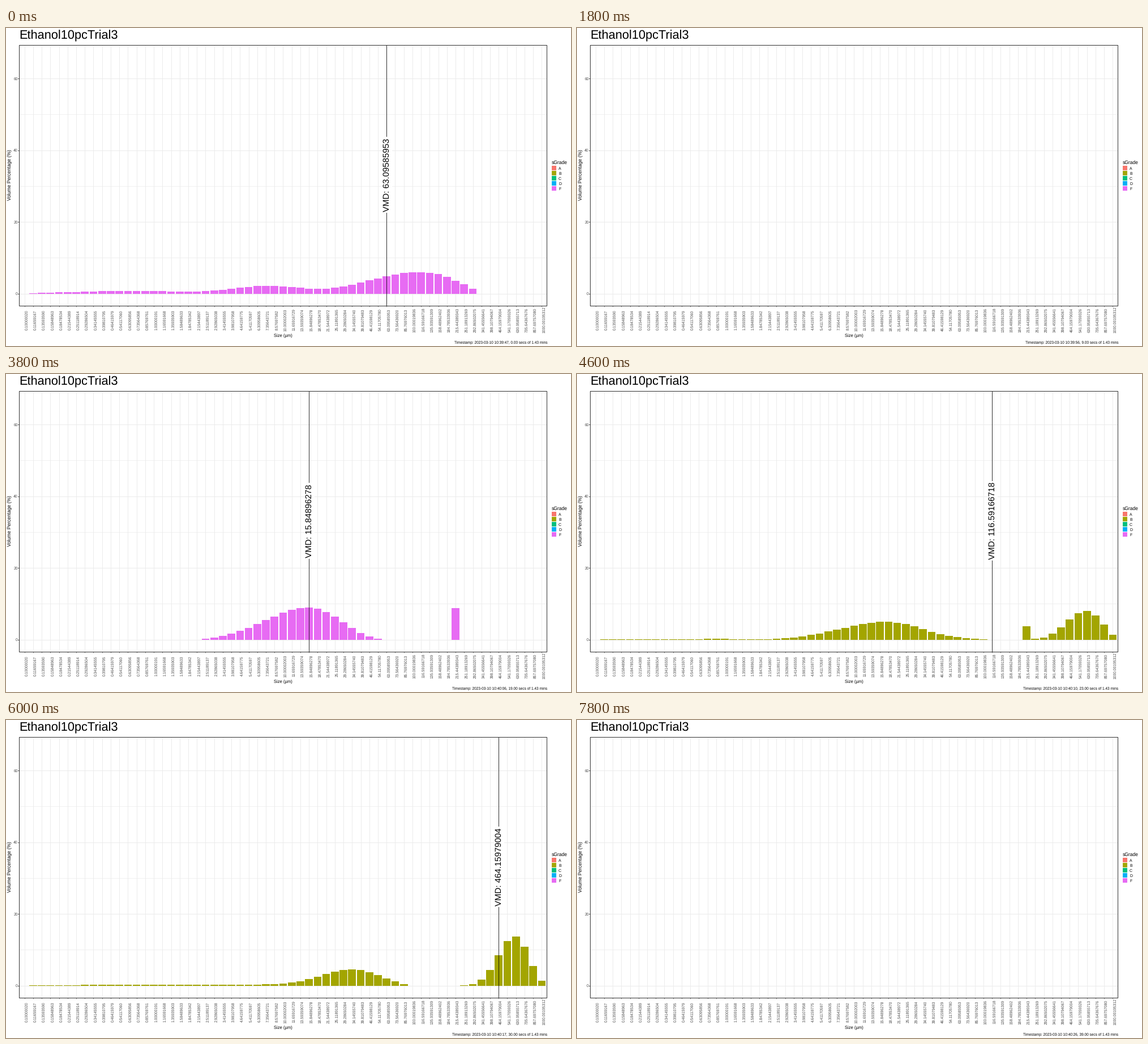
Recreate the animation shown at these times as a matplotlib script. Size 998 by 561 pixels, loop 8000 ms.

```python
import numpy as np
import matplotlib.pyplot as plt
from matplotlib.animation import FuncAnimation
from matplotlib.patches import Rectangle

W, H, DPI = 998, 561, 64
PT = 72 / DPI                              # points per pixel
FRAMES, STEP = 40, 200

LEFT, RIGHT, TOP, BOTTOM = 23.5, 955.5, 29.5, 489.5
ZERO, UNIT = 468.5, 6.325                  # y of 0 %, pixels per percent
BINS = 61
PITCH = (RIGHT - LEFT) / (BINS + 0.2)
XS = LEFT + PITCH * (np.arange(BINS) + 0.6)
SIZES = np.float32(10 ** (np.arange(BINS) / 15 - 1) * 1.000001965)

GRADES = {"A": "#F8766D", "B": "#A3A500", "C": "#00BF7D",
          "D": "#00B0F6", "F": "#E76BF3"}

plt.rcParams["font.family"] = "Liberation Sans"
plt.rcParams["text.hinting"] = "none"


def curve(knots, **runs):
    """Heights per bin: straight lines between knots, then exact runs."""
    y = np.interp(np.arange(BINS), *zip(*knots), right=0)
    for name, run in runs.items():
        start = int(name[1:])
        y[start:start + len(run)] = run
    return y


BROAD = curve([(0, 0), (1, .1), (3, .3), (7, .5), (10, .7), (14, .75),
               (19, .55), (21, .7), (23, 1.1), (25, 1.6), (27, 2.1),
               (28, 2.2), (30, 2), (33, 1.4), (35, 1.4), (37, 2)],
              b38=[2.5, 3.1, 3.7, 4.25, 4.8, 5.3, 5.7, 5.9, 6,
                   5.8, 5.4, 4.6, 3.6, 2.6, 1.4])
MEDIUM = curve([(12, 0), (13, .1), (17, .1), (20, .2), (22, .4)],
               b23=[.5, .75, 1, 1.35, 1.9, 2.5, 3.4, 4.4, 5.6, 6.9, 8.2,
                    9.2, 9.7, 9.4, 8.3, 6.6, 4.5, 2.6, 1.1, .2],
               b57=[12])
FINE = curve([(0, 0), (20, 0)],
             b21=[.2, .55, 1, 1.6, 2.4, 3.3, 4.3, 5.4, 6.4, 7.5, 8.3,
                  8.8, 9, 8.6, 7.7, 6.4, 4.8, 3.2, 1.8, .8, .2],
             b50=[8.8])
COARSE = curve([(0, 0), (1, .1), (6, .15), (14, .3), (20, .2), (23, .3),
                (26, .5), (28, .8), (30, 1.05), (32, 1.5), (34, 2.2),
                (35, 2.5), (36, 2.75), (37, 2.8), (38, 2.7), (39, 2.5),
                (40, 2.1), (42, 1.2), (44, .4), (45, .1), (46, 0)],
               b51=[.3, 1.1, 2.9, 5.9, 9.7, 12.9, 13.9, 11.7, 7.2, 2.3])
TWIN = curve([(0, 0), (1, .1), (6, .15), (14, .3), (20, .2), (27, .3),
              (29, .4), (30, .55)],
             b31=[.8, 1.2, 1.8, 2.5, 3.2, 3.9, 4.4, 4.5, 4.3, 3.7,
                  2.9, 2, 1.2, .4],
             b51=[.15, .4, 1.6, 4.4, 8.5, 12.4, 13.7, 10.8, 5.5, 1.3])

# second, heights, median bin, grade
BURSTS = [
    [(0, BROAD, 42, "F"), (6, COARSE, 55, "B")],
    [(12, COARSE, 55, "B"), (15, MEDIUM, 35, "F"), (19, FINE, 33, "F"),
     (26, COARSE, 55, "B"), (30, TWIN, 55, "B"), (35, TWIN, 55, "B")],
]


def state(sec):
    """Heights, median bin and grade at a second, or None between bursts."""
    for keys in BURSTS:
        for a, b in zip(keys, keys[1:]):
            if a[0] <= sec <= b[0]:
                u = (sec - a[0]) / (b[0] - a[0])
                mid = int(round(a[2] + (b[2] - a[2]) * u))
                return a[1] + (b[1] - a[1]) * u, mid, (b if u > .5 else a)[3]
    return None


fig = plt.figure(figsize=(W / DPI, H / DPI), dpi=DPI, facecolor="white")
ax = fig.add_axes([0, 0, 1, 1])
ax.set_xlim(0, W)
ax.set_ylim(H, 0)
ax.axis("off")


def label(x, y, s, px, color="black", **kw):
    return ax.text(x, y, s, fontsize=px * PT, color=color, **kw)


def upright(x, y, s, px, color="black", **kw):
    return label(x, y, s, px, color, rotation=90, ha="center", va="center", **kw)


def level(v):
    return ZERO - v * UNIT


# grid
for minor in (10, 30, 50):
    ax.hlines(level(minor), LEFT, RIGHT, color="#f0f0f0", lw=PT, zorder=1)
ax.hlines([level(v) for v in (0, 20, 40, 60)], LEFT, RIGHT,
          color="#ebebeb", lw=PT, zorder=1)
ax.vlines(XS, TOP, BOTTOM, color="#ebebeb", lw=PT, zorder=1)

# frame, ticks and tick labels
ax.add_patch(Rectangle((LEFT, TOP), RIGHT - LEFT, BOTTOM - TOP, fill=False,
                       ec="#333333", lw=PT, zorder=6))
for v in (0, 20, 40, 60):
    ax.hlines(level(v), LEFT - 2, LEFT, color="#333333", lw=PT)
    label(21, level(v) + 2.5, str(v), 6.9, "#4d4d4d", ha="right")
ax.vlines(XS, BOTTOM, BOTTOM + 2, color="#333333", lw=.6 * PT)
for x, size in zip(XS, SIZES):
    upright(x + 4.1, 515, f"{size:.8f}", 6.7, "#4d4d4d")

# titles
label(23, 19, "Ethanol10pcTrial3", 21.8)
upright(7, 259, "Volume Percentage (%)", 8.5)
label(489, 545, "Size (µm)", 7.6, ha="center")

# legend
label(964, 240, "sGrade", 8.5)
for i, (grade, color) in enumerate(GRADES.items()):
    y = 247 + 9 * i
    ax.add_patch(Rectangle((964, y - 4), 8.5, 8, fc=color, lw=0))
    label(976, y + 2.7, grade, 6.9)

# moving parts
bars = [ax.add_patch(Rectangle((x - .45 * PITCH, ZERO), .9 * PITCH, 0,
                               lw=0, zorder=2)) for x in XS]
line, = ax.plot([0, 0], [TOP, BOTTOM], color="black", lw=.8 * PT, zorder=3)
median = upright(0, 259, "", 15, zorder=4,
                 bbox=dict(fc="white", ec="none", pad=2 * PT))
stamp = label(956, 556.5, "", 6.5, ha="right")


def draw(sec):
    now = state(sec)
    heights, mid, grade = now or (np.zeros(BINS), 0, "F")
    for bar, h in zip(bars, heights):
        bar.set_height(-h * UNIT)
        bar.set_facecolor(GRADES[grade])
        bar.set_visible(h > 0)
    line.set_xdata([XS[mid]] * 2)
    median.set_x(XS[mid] + 1)
    median.set_text(f"VMD: {SIZES[mid]:.8f}")
    line.set_visible(now is not None)
    median.set_visible(now is not None)
    m, s = divmod(39 * 60 + 47 + sec, 60)
    stamp.set_text(f"Timestamp: 2023-03-10 10:{m:02d}:{s:02d}, "
                   f"{sec:.2f} secs of 1.43 mins")
    return [*bars, line, median, stamp]


anim = FuncAnimation(fig, draw, frames=FRAMES, init_func=lambda: draw(0),
                     interval=STEP, repeat=True, repeat_delay=0)
plt.show()
```
